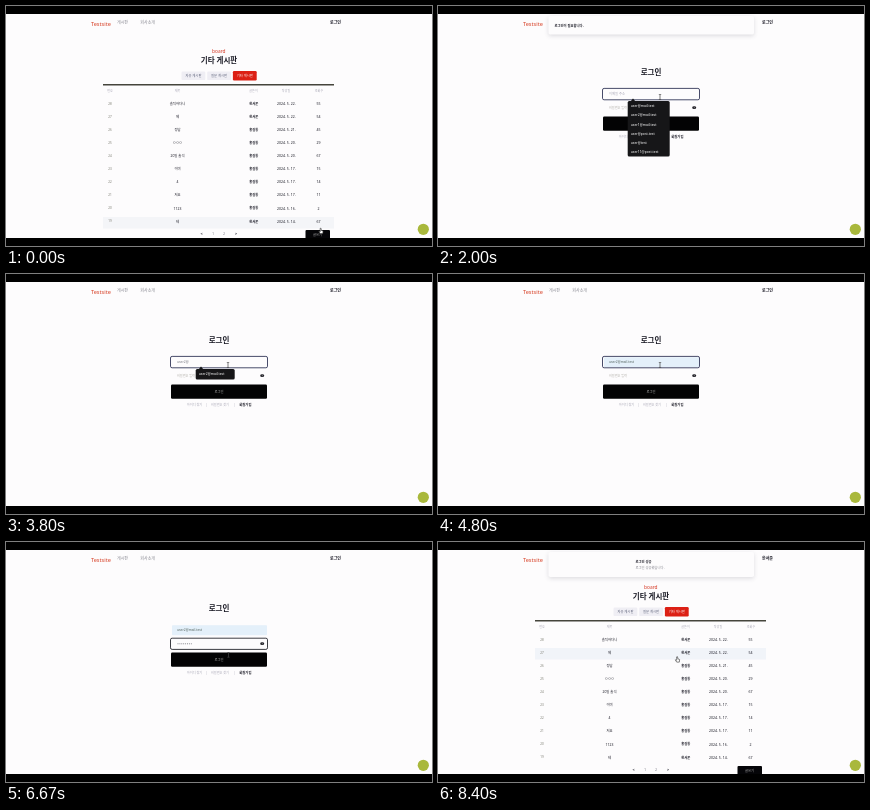
Write an HTML page with a canvas that moves like this. It is 426x240 px and loops after 8470 ms.

```html
<!DOCTYPE html>
<html lang="ko">
<head>
<meta charset="utf-8">
<title>로그인</title>
<style>
html, body { margin: 0; width: 100%; height: 100%; overflow: hidden; background: #000; }
canvas { display: block; width: 426px; height: 240px; }
</style>
</head>
<body>
<canvas id="stage"></canvas>
<script>
const W = 426, H = 240, LOOP = 8470, STEP = 200 / 3;
const FONT = '"Noto Sans", "Noto Sans CJK KR", "Noto Sans CJK JP", sans-serif';
const PAGE = '#fdfcfd', INK = '#1b1b26', GREY = '#85858f', PALE = '#a9a7b6', RED = '#dc2015';

const canvas = document.getElementById('stage');
const ctx = canvas.getContext('2d');
const ratio = window.devicePixelRatio || 1;
canvas.width = W * ratio;
canvas.height = H * ratio;

// Times of the events, in ms
const T = {
  login: 470, focus: 1930, type: 2530, fill: 4400, tab: 4870,
  secret: 5330, hover: 6800, board: 7930
};

const MAIL = 'user2@mail.test';
const MAILS = ['user@mail.test', 'user2@mail.test', 'user1@mail.test',
  'user@post.test', 'user@test', 'user11@post.test'];

const ROWS = [
  ['솔직하다니', '한서준', 22, 55], ['제', '한서준', 22, 54],
  ['정답', '홍길동', 21, 45], ['ㅁㅁㅁ', '홍길동', 20, 29],
  ['20일 출석', '홍길동', 20, 67], ['이미', '홍길동', 17, 15],
  ['4', '홍길동', 17, 14], ['저요', '홍길동', 17, 11],
  ['1123', '홍길동', 16, 2], ['테', '한서준', 14, 67]
];

// time, x, y
const PATH = [
  [0, 315, 225], [470, 315, 225], [1070, 224, 95.5], [1330, 224, 95.5],
  [1800, 222, 91], [6200, 222, 91], [6870, 222.5, 119],
  [7930, 222.5, 119], [8330, 239.5, 117.5], [LOOP, 239.5, 117.5]
];

const clamp = v => Math.max(0, Math.min(1, v));
const ease = v => v * v * (3 - 2 * v);

function text(s, x, y, size, color, align = 'left', weight = 400) {
  ctx.font = `${weight} ${size}px ${FONT}`;
  ctx.textAlign = align;
  ctx.textBaseline = 'alphabetic';
  ctx.fillStyle = color;
  ctx.fillText(s, x, y + size * 0.36);
}

function box(x, y, w, h, r, fill, stroke, line = 1) {
  ctx.beginPath();
  ctx.roundRect(x, y, w, h, r);
  if (fill) { ctx.fillStyle = fill; ctx.fill(); }
  if (stroke) { ctx.strokeStyle = stroke; ctx.lineWidth = line; ctx.stroke(); }
}

function dot(x, y, r, color) {
  ctx.beginPath();
  ctx.arc(x, y, r, 0, Math.PI * 2);
  ctx.fillStyle = color;
  ctx.fill();
}

function nav(user) {
  text('Testsite', 85, 17.6, 5.6, '#d63c22', 'left', 500);
  text('게시판', 111, 17, 4, GREY);
  text('회사소개', 134.3, 17, 4, GREY);
  text(user, 335, 17, 4, INK, 'right', 700);
}

function board(t) {
  text('board', 212.8, 45, 4.8, '#d43420', 'center', 500);
  text('기타 게시판', 213, 54.7, 7.5, INK, 'center', 700);
  ['자유 게시판', '질문 게시판', '기타 게시판'].forEach((s, i) => {
    const on = i === 2, x = 175.5 + i * 25.7;
    box(x, on ? 65 : 65.5, 23.8, on ? 9.5 : 8.6, 1.2, on ? RED : '#efeef4');
    text(s, x + 11.9, 69.7, 3.3, on ? '#fff' : '#60657c', 'center');
  });
  box(97, 78, 231, 1.5, 0, '#45453c');
  [['번호', 104], ['제목', 171.5], ['글쓴이', 247.5], ['작성일', 280], ['조회수', 313]]
    .forEach(([s, x]) => text(s, x, 85, 3, PALE, 'center'));

  ROWS.forEach(([title, author, day, views], i) => {
    const y = 97.5 + i * 13.1;
    if (i === 1 && t >= 8200) box(97, y - 4.5, 231, 11.5, 0, '#f1f4f9');
    if (i === 9 && t < 270) {
      ctx.globalAlpha = 1 - t / 270;
      box(97, y - 4.5, 231, 11.5, 0, '#f4f5f8');
      ctx.globalAlpha = 1;
    }
    text(28 - i, 104, y, 3, '#77776c', 'center');
    text(title, 171.5, y, 3.4, INK, 'center', 500);
    text(author, 247.7, y, 3.3, INK, 'center', 700);
    text(`2024. 5. ${day}.`, 280.3, y, 3.5, INK, 'center', 500);
    text(views, 312.5, y, 3.5, INK, 'center', 500);
  });

  [['<', 195.5], ['1', 207], ['2', 218], ['>', 230]]
    .forEach(([s, x], i) => text(s, x, 227.3, 3.8, i % 3 ? GREY : INK, 'center', i % 3 ? 400 : 700));
  box(299.5, 224, 24.5, 9, 1, '#050508');
  text('글쓰기', 311.5, 229, 3.3, '#aaa', 'center');
}

function eye() {
  ctx.beginPath();
  ctx.ellipse(256.2, 101.7, 2, 1.4, 0, 0, Math.PI * 2);
  ctx.fillStyle = '#1c1c22';
  ctx.fill();
  dot(256.2, 101.7, 0.45, '#fff');
}

function suggestions(list) {
  const w = list.length > 1 ? 42 : 39, h = list.length > 1 ? 55.5 : 10.5;
  ctx.fillStyle = '#161618';
  ctx.beginPath();
  ctx.moveTo(192.5, 95.5);
  ctx.lineTo(195, 92.5);
  ctx.lineTo(197.5, 95.5);
  ctx.fill();
  box(189.7, 95, w, h, 1.5, '#161618');
  list.forEach((s, i) => text(s, 192.7, 100.1 + i * 9.1, 3.4, '#fff', 'left', 500));
}

function login(t) {
  const filled = t >= T.fill;
  const typed = MAIL.slice(0, Math.max(0, Math.min(6, Math.floor((t - T.type) / 180) + 1)));
  const stars = Math.max(0, Math.min(8, Math.floor((t - T.secret) / 150)));
  const first = t >= T.focus && t < T.tab;
  const second = t >= T.tab && t < 7000;
  const listed = t >= T.focus + 70 && !filled;

  text('로그인', 213, 66.7, 7.5, INK, 'center', 700);

  if (filled) box(166, 83.3, 95, 10, 0.8, '#e4f0fa');
  if (first) box(164.5, 82.4, 97, 11.4, 1.6, null, '#34385a', 0.9);
  const mail = filled ? MAIL : t >= T.type ? typed : '';
  text(mail || '이메일 주소', 171, 88, 3.3, mail ? (filled ? '#54645f' : '#777982') : PALE);

  if (second) box(164.5, 96.2, 97, 11.2, 1.6, null, '#26272e', 0.9);
  if (stars) {
    for (let i = 0; i < stars; i++) dot(172 + i * 1.9, 101.8, 0.55, '#77777e');
  } else text('비밀번호 입력', 171, 101.6, 3.1, '#b3b0aa');
  eye();

  box(165, 110.6, 96, 14.2, 1.2, t >= T.hover ? '#37363a' : '#030304');
  text('로그인', 213, 117.8, 3.3, '#b2b2b2', 'center');

  text('아이디 찾기', 180.8, 131, 3.2, PALE);
  text('|', 200.5, 131, 3, PALE, 'center');
  text('비밀번호 찾기', 205, 131, 3.1, PALE);
  text('|', 228.5, 131, 3, PALE, 'center');
  text('회원가입', 233.3, 131, 3.3, INK, 'left', 700);

  if (listed) suggestions(typed.length > 4 && t >= T.type ? [MAIL] : MAILS);
}

// Notice that drops in from the top edge
function toast(t, from, to, h, lines) {
  if (t < from || t > to) return;
  const k = Math.min(ease(clamp((t - from) / 270)), ease(clamp((to - t) / 200)));
  ctx.save();
  ctx.globalAlpha = k;
  ctx.translate(0, (k - 1) * 14);
  ctx.save();
  ctx.shadowColor = 'rgba(60,60,80,.17)';
  ctx.shadowBlur = 4 * ratio;
  ctx.shadowOffsetY = 1.5 * ratio;
  box(110.5, 10, 205.5, h, 1.8, PAGE);
  ctx.restore();
  lines.forEach(([s, x, y, color, weight]) => text(s, x, y, 3.3, color, 'left', weight));
  ctx.restore();
}

function hand(x, y) {
  ctx.save();
  ctx.translate(x, y);
  ctx.beginPath();
  ctx.moveTo(-0.9, -2.6);
  ctx.lineTo(0, -2.8);
  ctx.lineTo(0.4, -0.6);
  ctx.lineTo(2.1, 0);
  ctx.lineTo(1.8, 2.6);
  ctx.lineTo(-0.8, 2.6);
  ctx.lineTo(-2.2, 0.3);
  ctx.lineTo(-0.7, 0.6);
  ctx.closePath();
  ctx.lineJoin = 'round';
  ctx.fillStyle = '#fff';
  ctx.strokeStyle = '#333';
  ctx.lineWidth = 0.6;
  ctx.fill();
  ctx.stroke();
  ctx.restore();
}

function beam(x, y) {
  ctx.fillStyle = '#444';
  ctx.fillRect(x - 0.35, y - 2.4, 0.7, 4.8);
  ctx.fillRect(x - 1.2, y - 2.6, 2.4, 0.6);
  ctx.fillRect(x - 1.2, y + 2, 2.4, 0.6);
}

function pointer(t) {
  const i = Math.max(1, PATH.findIndex(p => p[0] > t));
  const [t0, x0, y0] = PATH[i - 1], [t1, x1, y1] = PATH[i];
  const k = ease((t - t0) / (t1 - t0));
  const x = x0 + (x1 - x0) * k, y = y0 + (y1 - y0) * k;
  (t >= 900 && t < T.hover ? beam : hand)(x, y);
}

function draw(t) {
  const onLogin = t >= T.login && t < T.board;
  ctx.setTransform(ratio, 0, 0, ratio, 0, 0);
  ctx.fillStyle = '#000';
  ctx.fillRect(0, 0, W, H);
  ctx.save();
  ctx.beginPath();
  ctx.rect(0, 8, W, 224);
  ctx.clip();
  ctx.fillStyle = PAGE;
  ctx.fillRect(0, 0, W, H);

  nav(t >= T.board ? '한서준' : '로그인');
  if (onLogin) login(t); else board(t);
  toast(t, T.login + 60, 3470, 18.5, [['로그인이 필요합니다.', 116.5, 19.8, INK, 700]]);
  toast(t, T.board, LOOP + 500, 25, [
    ['로그인 성공', 197.5, 19.8, INK, 700],
    ['로그인 성공했습니다.', 197.5, 26, GREY, 400]
  ]);
  pointer(t);
  dot(417.3, 223.3, 5.6, '#a9b83c');
  ctx.restore();
}

const start = performance.now();
function tick() {
  const t = (performance.now() - start) % LOOP;
  draw(Math.floor(t / STEP + 0.01) * STEP);
  requestAnimationFrame(tick);
}
tick();
</script>
</body>
</html>
```
